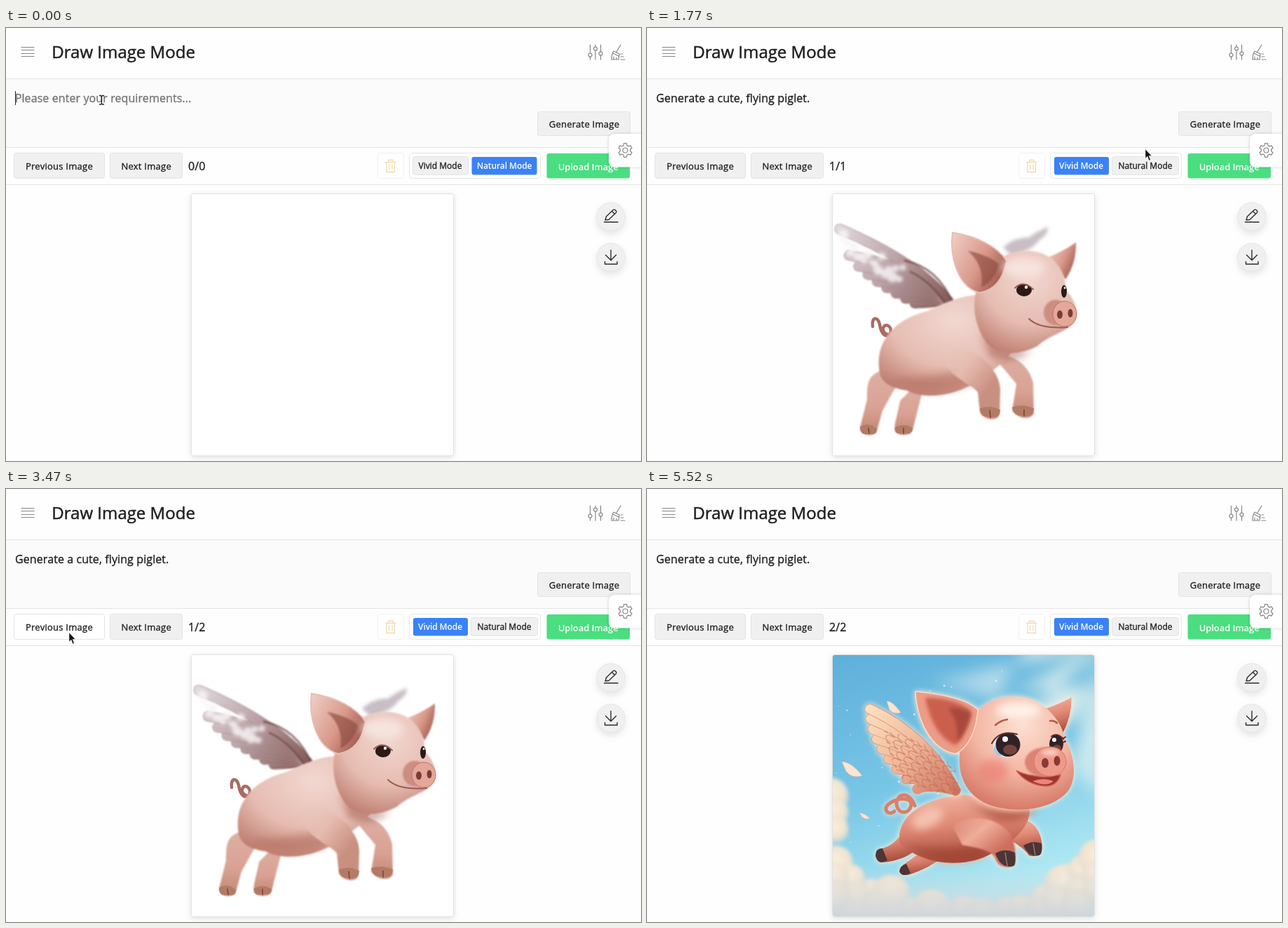
Animation of 906 by 618 pixels, one loop 5.99 s. Source, as an HTML page:

```html
<!DOCTYPE html>
<html lang="en">
<head>
<meta charset="utf-8">
<title>Draw Image Mode</title>
<style>
html, body { margin: 0; width: 100%; height: 100%; overflow: hidden; background: #fefefe; }
svg { display: block; width: 906px; height: 618px; font: 400 16px "Open Sans", "Noto Sans", sans-serif; fill: #212121; }
text { stroke: #212121; stroke-width: .35px; letter-spacing: .1px; }
.rule { fill: #e4e4e6; }
.btn { fill: #f0f0f1; stroke: #e3e3e5; }
.label { font-size: 13px; letter-spacing: .25px; text-anchor: middle; }
.mode { font-size: 12px; letter-spacing: 0; text-anchor: middle; }
.on { fill: #fff; stroke: none; font-weight: 600; letter-spacing: -.1px; }
.faint { fill: #757575; stroke: #757575; }
.line { fill: none; stroke-linecap: round; stroke-linejoin: round; }
.grey { stroke: #858585; stroke-width: 1.2; }
.dark { stroke: #2b2b2b; stroke-width: 1.4; }
.lift { filter: drop-shadow(0 5px 5px rgba(0,0,0,.1)); }
.card { filter: drop-shadow(0 2px 4px rgba(0,0,0,.12)); }
.halo { filter: drop-shadow(0 0 4px #ffeeda); }
.soft { filter: blur(1.2px); }
.misty { filter: blur(2.5px); }
.hazy { filter: blur(6px); }
.beams { filter: blur(11px); }
</style>
</head>
<body>
<svg viewBox="0 0 906 618">
<defs>
  <clipPath id="frame"><rect x="265" y="237" width="373" height="373" rx="3"/></clipPath>
  <radialGradient id="skin" cx=".55" cy=".25" r=".85">
    <stop stop-color="#f2d8d1"/><stop offset=".55" stop-color="#e6bcb1"/><stop offset="1" stop-color="#b87466"/>
  </radialGradient>
  <linearGradient id="limb" x2="0" y2="1">
    <stop stop-color="#deb0a5"/><stop offset=".6" stop-color="#d9a193"/><stop offset="1" stop-color="#c08472"/>
  </linearGradient>
  <linearGradient id="arm" x2=".7" y2=".7">
    <stop offset=".05" stop-color="#ecc9bf" stop-opacity="0"/><stop offset=".5" stop-color="#e6bcb0"/><stop offset="1" stop-color="#c98f80"/>
  </linearGradient>
  <linearGradient id="ear" x2="1" y2=".6">
    <stop stop-color="#f0cfc6"/><stop offset=".6" stop-color="#d9998a"/><stop offset="1" stop-color="#a45d50"/>
  </linearGradient>
  <linearGradient id="plume" gradientUnits="userSpaceOnUse" x1="268" y1="285" x2="438" y2="392">
    <stop stop-color="#e2dbdf"/><stop offset=".45" stop-color="#bea7ab"/><stop offset="1" stop-color="#805551"/>
  </linearGradient>
  <linearGradient id="sky" x1=".1" x2=".4" y2="1">
    <stop stop-color="#5fb0dc"/><stop offset=".5" stop-color="#78c6e6"/><stop offset="1" stop-color="#b4ecf4"/>
  </linearGradient>
  <linearGradient id="ray" x1="1" y1="0" x2="0" y2=".8">
    <stop stop-color="#fffbe8"/><stop offset="1" stop-color="#fff" stop-opacity="0"/>
  </linearGradient>
  <radialGradient id="puff" cx=".5" cy=".4" r=".6">
    <stop stop-color="#f9efdb"/><stop offset=".6" stop-color="#f1e4d1"/><stop offset="1" stop-color="#dcd8d0" stop-opacity=".5"/>
  </radialGradient>
  <linearGradient id="mist" x2="0" y2="1">
    <stop stop-color="#d3d9de" stop-opacity="0"/><stop offset="1" stop-color="#ccd4dc" stop-opacity=".9"/>
  </linearGradient>
  <radialGradient id="face" cx=".55" cy=".25" r=".85">
    <stop stop-color="#fce0d2"/><stop offset=".5" stop-color="#f4b6a4"/><stop offset="1" stop-color="#cf6857"/>
  </radialGradient>
  <linearGradient id="belly" x2=".2" y2="1">
    <stop stop-color="#f4b9a5"/><stop offset=".5" stop-color="#e08976"/><stop offset="1" stop-color="#a94c3b"/>
  </linearGradient>
  <linearGradient id="reach" x2=".7" y2=".7">
    <stop offset=".05" stop-color="#f3b9a6" stop-opacity="0"/><stop offset=".5" stop-color="#f0ad9a"/><stop offset="1" stop-color="#cd6f5e"/>
  </linearGradient>
  <linearGradient id="quill" gradientUnits="userSpaceOnUse" x1="310" y1="310" x2="446" y2="434">
    <stop stop-color="#fde3c2"/><stop offset=".5" stop-color="#f1b799"/><stop offset="1" stop-color="#cb705c"/>
  </linearGradient>
  <pattern id="scales" width="13" height="11" patternUnits="userSpaceOnUse" patternTransform="rotate(35)">
    <path class="line" d="M13 0Q0 1 1 5.500Q2 10 13 11" stroke="#b9624a" stroke-width="1.1"/>
  </pattern>
</defs>

<rect width="906" height="618" fill="#fefefe"/>
<rect y="73" width="906" height="97" fill="#fbfbfb"/>
<path class="rule" d="M0 72H906V73H0ZM0 170H906V171H0ZM0 223H906V224H0Z"/>

<!-- header -->
<path class="line grey" d="M22 27.500H40M22 31.500H40M22 36.500H40M22 40.500H40"/>
<text x="65.300" y="42.500" style="font-size:24px;letter-spacing:0;stroke-width:.5px">Draw Image Mode</text>
<g class="line grey">
  <path d="M833.500 24V36M833.500 41V45M841 24V27M841 32V45M848.500 24V34M848.500 39V45"/>
  <circle cx="833.500" cy="38.500" r="2.500"/><circle cx="841" cy="29.500" r="2.500"/><circle cx="848.500" cy="36.500" r="2.500"/>
  <path d="M877 24L871 34M867 33L875 37L874 45H864Q864 37 867 33ZM866 36L874 40M867 45V41M871 45V42M877 37H880M877 41H881M877 45H883"/>
</g>

<!-- prompt -->
<g id="hint">
  <text class="faint" x="12.700" y="105.500">Please enter your requirements...</text>
  <rect x="13" y="90" width="1" height="20"/>
</g>
<text id="prompt" x="13" y="105.500">Generate a cute, flying piglet.</text>
<rect id="generate" class="btn" x="758.500" y="119.500" width="132" height="34" rx="3"/>
<text class="label" x="825" y="141.500">Generate Image</text>

<!-- toolbar -->
<rect id="previous" class="btn" x="11.500" y="178.500" width="129" height="36" rx="3"/>
<text class="label" x="76" y="202">Previous Image</text>
<rect id="next" class="btn" x="148.500" y="178.500" width="103" height="36" rx="3"/>
<text class="label" x="200.200" y="202">Next Image</text>
<g>
  <text id="none" x="260" y="202.500">0/0</text>
  <text id="single" x="260" y="202.500">1/1</text>
  <text id="first" x="260" y="202.500">1/2</text>
  <text id="second" x="260" y="202.500">2/2</text>
</g>
<rect x="530.500" y="178.500" width="37" height="36" rx="3" fill="#fff" stroke="#f0f0f0"/>
<path class="line" stroke="#f1d9b0" stroke-width="1.300" d="M541.500 191.500H556M545.500 191V188.500H552V191M543 192V205.500H554.500V192M546.500 195V202M551 195V202"/>
<rect x="575.500" y="178.500" width="187" height="36" rx="4" fill="#fff" stroke="#e6e6e8"/>
<g id="natural">
  <rect class="btn" x="580.500" y="183.500" width="79" height="26" rx="3"/>
  <rect x="664.500" y="184" width="93" height="25.500" rx="3" fill="#3b82f6"/>
  <text class="mode" x="619.500" y="201">Vivid Mode</text>
  <text class="mode on" x="711" y="201">Natural Mode</text>
</g>
<g id="vivid">
  <rect x="581" y="184" width="78" height="25.500" rx="3" fill="#3b82f6"/>
  <rect class="btn" x="663.500" y="183.500" width="95" height="26" rx="3"/>
  <text class="mode on" x="619.500" y="201">Vivid Mode</text>
  <text class="mode" x="711" y="201">Natural Mode</text>
</g>
<rect x="771.500" y="179" width="118.500" height="35.500" rx="3" fill="#4ade80"/>
<text class="label on" x="830.700" y="203">Upload Image</text>
<rect x="860" y="151" width="60" height="47.500" rx="8" fill="#fff" style="filter:drop-shadow(0 0 2px rgba(0,0,0,.18))"/>
<polygon id="gear" class="line grey" transform="translate(883.500 174.500)"/>
<circle class="line grey" cx="883.500" cy="174.500" r="3.500"/>

<!-- side buttons -->
<g class="lift" fill="#f0f0f1" stroke="#e6e6e8"><circle cx="863" cy="269" r="20"/><circle cx="863" cy="327" r="20"/></g>
<path class="line dark" d="M853.500 277H873M855 274L856.500 269L866.500 259.500Q868 258.500 869.500 260L870.500 261Q871.500 262.500 870 264L860 273.500ZM864.500 261.500L868.500 265.500"/>
<path class="line dark" d="M863 317V331M855.500 324L863 331.500L870.500 324M854.500 333.500V337H872V333.500"/>

<!-- picture card -->
<rect class="card" x="264.500" y="236.500" width="374" height="374" rx="3" fill="#fff" stroke="#e2e2e4"/>

<g id="piglet" clip-path="url(#frame)">
  <path class="misty" fill="#c9bec5" d="M508 313Q525 298 545 299Q560 288 572 284Q572 296 560 302Q550 318 520 325Z"/>
  <g class="soft"><g id="plumes" class="line"></g>
    <path class="line" stroke="#754b48" stroke-width="3" d="M368 332Q415 342 436 392M376 348Q405 362 425 392" opacity=".7"/>
  </g>
  <g id="down" class="misty" fill="#f7f4f7" opacity=".85"></g>
  <path class="line" stroke="#a96c62" stroke-width="4.500" d="M322 426C320 411 330 412 332 423C334 438 342 443 347 436C351 428 341 419 337 428C335 435 344 440 350 437"/>
  <g class="soft" fill="url(#limb)">
    <path d="M340 488C314 493 314 508 314 530L304 570C303 583 326 584 328 575L336 546L355 512Z"/>
    <path d="M385 508L361 532C358 550 351 570 354 576C360 583 377 582 379 574L386 546L394 515Z"/>
    <path d="M497 472L527 508L521 546C530 559 548 559 552 550L551 507C545 480 525 469 505 466Z"/>
  </g>
  <path class="soft" fill="url(#skin)" d="M332 492C325 455 345 418 400 404C440 385 465 376 490 385L528 445C524 470 490 492 462 510C432 526 395 530 370 517C348 514 335 506 332 492Z"/>
  <path class="hazy" fill="#a9604f" opacity=".45" d="M345 500Q395 500 440 490Q470 500 455 510Q400 530 345 500Z"/>
  <path class="soft" fill="url(#arm)" d="M418 468C430 498 463 508 472 520L475 549C483 561 500 561 503 552L504 518C505 495 480 460 440 456Z"/>
  <g fill="#b37b64"><path d="M304 569Q316 562 328 572Q328 582 317 579Q304 583 304 569ZM354 570Q367 563 379 571Q378 582 366 578Q353 582 354 570ZM475 543Q490 537 504 545Q503 559 490 555Q476 557 475 543ZM521 541Q537 536 552 543Q551 557 538 553Q523 555 521 541Z"/></g>
  <path class="line" stroke="#774336" stroke-width="1.500" d="M317 579L316 571M366 579L366 571M490 556L489 546M538 554L538 545"/>
  <path class="soft" fill="url(#ear)" d="M573 327Q595 318 612 306Q613 335 597 359Z"/>
  <path class="hazy" fill="#9b5549" opacity=".55" d="M474 430Q500 470 548 458Q530 482 490 470Z"/>
  <path class="soft" fill="url(#skin)" d="M468 385C472 342 505 318 545 318C582 320 598 348 598 375C612 388 617 410 608 422C595 435 575 438 557 454C530 468 500 468 485 450C470 430 465 405 468 385Z"/>
  <path fill="url(#ear)" stroke="#e7beb4" stroke-width="2" d="M436 292C432 320 440 368 474 378C494 375 508 360 513 332C500 312 470 297 436 292Z"/>
  <path class="soft" fill="#8d4a40" opacity=".65" d="M458 318Q490 325 503 338Q495 362 477 370Q482 340 458 318Z"/>
  <ellipse class="hazy" cx="537" cy="342" rx="30" ry="14" fill="#f6e3dd"/>
  <g fill="#2c1a18"><ellipse cx="538" cy="374" rx="11" ry="9"/><ellipse cx="595" cy="376" rx="4" ry="9"/></g>
  <g fill="#fff"><circle cx="541" cy="370" r="2.200"/><circle cx="596" cy="371" r="1.400"/></g>
  <path class="line" stroke="#9b5b51" stroke-width="2" d="M525 371Q537 359 551 373M545 415Q560 430 600 427"/>
  <ellipse class="soft" cx="583" cy="406" rx="17" ry="18" fill="#cf8c82"/>
  <ellipse cx="596" cy="408" rx="17" ry="18" fill="#e6a79b" stroke="#b8766b"/>
  <g fill="#7c3a34"><ellipse cx="589" cy="409" rx="4" ry="6"/><ellipse cx="604" cy="407" rx="3.500" ry="6"/></g>
</g>

<g id="flyer" clip-path="url(#frame)">
  <rect x="264" y="236" width="375" height="375" fill="url(#sky)"/>
  <g class="beams" fill="url(#ray)"><path d="M650 225L400 275L500 300ZM650 225L530 330L615 330ZM650 235L605 400L650 440ZM540 225L650 225L650 280L500 290Z"/></g>
  <g id="sparks" fill="#fff" opacity=".7"></g>
  <g id="clouds" class="misty"></g>
  <rect x="264" y="540" width="375" height="71" fill="url(#mist)"/>
  <g fill="#fde4d3" stroke="#e3b7a4" stroke-width=".7">
    <path d="M342 303Q350 302 362 319Q352 322 346 315ZM278 389Q292 390 307 409Q293 414 284 403ZM303 462Q311 463 318 470Q309 474 303 462Z"/>
  </g>
  <g class="halo">
    <path class="line" stroke="#d8806c" stroke-width="5" d="M382 452C374 430 356 434 356 450C358 466 376 464 377 450C375 434 338 446 341 458C343 464 350 463 353 460"/>
    <g fill="url(#belly)">
      <path d="M372 478C355 508 345 510 332 514C324 520 326 532 334 533C358 532 380 522 390 508Z"/>
      <path d="M400 512L366 536C357 546 364 552 372 551C392 545 412 535 424 522Z"/>
      <path d="M516 475C540 464 560 480 563 503C566 520 558 527 545 523C538 512 525 505 510 497Z"/>
      <path d="M360 495C362 465 395 442 450 436L545 452C552 480 520 508 480 526C435 543 385 530 360 505Z"/>
    </g>
    <ellipse class="hazy" cx="400" cy="470" rx="24" ry="13" fill="#f8cdbb" opacity=".8" transform="rotate(-25 400 470)"/>
    <path class="hazy" fill="#98402f" opacity=".6" d="M370 508Q430 520 480 505Q490 520 470 528Q410 540 370 508ZM450 445Q505 472 560 451Q540 478 500 474Z"/>
    <path class="soft" fill="url(#reach)" d="M436 482C460 460 502 470 518 492C527 508 527 525 524 537C515 542 502 540 498 530C493 516 480 514 450 508Z"/>
    <g fill="#4b3537"><path d="M326 524Q326 512 336 513L343 530Q330 537 326 524ZM360 546Q361 537 370 535L376 548Q364 555 360 546ZM497 520Q511 512 525 519Q527 536 523 538Q505 543 497 520ZM537 509Q550 501 563 506Q565 521 559 523Q546 526 537 509Z"/></g>
    <path class="line" stroke="#a88a86" stroke-width="1.200" d="M511 519L514 538M551 506L554 523"/>
  </g>
  <g id="quills" class="line halo"></g>
  <path fill="url(#scales)" opacity=".65" d="M338 345Q400 355 440 400L447 433Q400 440 362 412Q345 385 338 345Z"/>
  <g class="halo">
    <path fill="url(#belly)" stroke="#fbd9c5" d="M566 314Q590 306 606 297Q607 325 592 352Z"/>
    <path fill="url(#face)" d="M446 382C448 330 480 295 525 296C562 297 590 325 597 358C612 385 613 415 600 432C580 455 540 461 510 456C465 450 444 420 446 382Z"/>
    <path fill="#ec9c87" stroke="#fcdcc9" stroke-width="1.500" d="M383 289C385 330 405 372 440 378C458 370 470 345 472 315C455 298 415 292 383 289Z"/>
  </g>
  <path class="misty" fill="#cb5f4e" d="M397 298Q440 298 463 317Q455 352 440 366Q408 352 397 298Z"/>
  <path class="misty" fill="#963d33" opacity=".65" d="M430 312Q455 312 463 322Q455 350 442 362Q446 335 430 312Z"/>
  <ellipse class="hazy" cx="530" cy="316" rx="32" ry="11" fill="#fff1e7"/>
  <ellipse class="hazy" cx="494" cy="402" rx="22" ry="16" fill="#ec7a70" opacity=".6"/>
  <g>
    <ellipse cx="513" cy="366" rx="19" ry="17" fill="#e6eef2"/><ellipse cx="515" cy="365" rx="17.500" ry="17" fill="#2f2226"/>
    <ellipse cx="518" cy="372" rx="10" ry="7" fill="#774338"/><circle cx="511" cy="357" r="4" fill="#fff"/><path fill="#8dcdf0" d="M496 364Q498 378 509 380Q500 384 495 372Z"/>
    <ellipse cx="584" cy="364" rx="10" ry="13" fill="#2f2226"/><ellipse cx="585" cy="370" rx="6" ry="5" fill="#774338"/><circle cx="581" cy="358" r="3" fill="#fff"/>
  </g>
  <path class="line" stroke="#5b2a27" stroke-width="2" d="M492 363Q503 343 528 350M577 353Q586 347 594 357M592 357L597 354M593 362L597 360"/>
  <path class="line" stroke="#b8594a" stroke-width="2.500" d="M497 337Q505 330 514 329M575 331Q581 330 585 334"/>
  <path fill="#9c342f" stroke="#c9604f" stroke-width="1.500" d="M527 402Q550 414 590 408Q585 424 568 424Q542 422 527 402Z"/>
  <path fill="#ee8478" d="M550 417Q566 411 580 417Q570 426 550 417Z"/>
  <ellipse class="soft" cx="567" cy="390" rx="28" ry="21" fill="#dd8376"/>
  <ellipse cx="575" cy="389" rx="23" ry="21" fill="#ee9a8b" stroke="#d4766a"/>
  <ellipse class="misty" cx="575" cy="376" rx="12" ry="4" fill="#fbd0c3"/>
  <g fill="#8e3833"><ellipse cx="568" cy="391" rx="5" ry="7"/><ellipse cx="585" cy="388" rx="4.500" ry="7"/></g>
</g>

<!-- pointers -->
<g id="beam"><path class="line" stroke="#222" stroke-width="1.300" d="M133.500 96.500H135.500L136.500 97.500L137.500 96.500H139.500M136.500 97.500V108M133.500 109H135.500L136.500 108L137.500 109H139.500"/></g>
<g id="pointer">
  <circle id="click" r="12" fill="#f4ea2a" opacity="0"/>
  <path d="M0 0V13L3 10.300L5.200 16L7.400 15.200L5.100 9.600H9Z" fill="#111" stroke="#fff" stroke-width=".5"/>
</g>
</svg>

<script>
const LOOP = 5990;
const $ = id => document.getElementById(id);
const range = n => [...Array(n).keys()];

// Random numbers that are the same on every load
let seed = 7;
const rand = () => (seed = seed * 16807 % 2147483647) / 2147483647;

function add(parent, tag, attrs) {
  const el = document.createElementNS('http://www.w3.org/2000/svg', tag);
  for (const key in attrs) el.setAttribute(key, attrs[key]);
  $(parent).append(el);
}
const dot = (parent, cx, cy, r, extra) => add(parent, 'circle', { cx, cy, r, ...extra });

function feathers(parent, paint, edge, base, count, tipAt, bendAt) {
  for (const i of range(count).reverse()) {
    const u = i / (count - 1);
    const d = `M${tipAt(u)}Q${bendAt(u)} ${base}`;
    add(parent, 'path', { d, stroke: edge, 'stroke-width': 15 });
    add(parent, 'path', { d, stroke: `url(#${paint})`, 'stroke-width': 13.5 });
  }
}
feathers('plumes', 'plume', '#a98c8e', [430, 390], 9,
  u => [275 + 107 * u, 287 + 106 * Math.sqrt(u)], u => [388, 335 + 58 * u]);
feathers('quills', 'quill', '#d58f74', [440, 430], 9,
  u => [318 + 68 * u * u, 314 + 114 * u], u => [400, 352 + 68 * u]);

for (const i of range(18)) dot('down', 280 + i * 5, 295 + i * 2.5 + rand() * 28, 3 + rand() * 5);
for (const i of range(24)) dot('sparks', 270 + rand() * 260, 245 + rand() * 260, .5 + rand());

// Cloud bank: low in the middle, rising to both sides
for (const row of range(3)) for (const i of range(15)) {
  const x = 262 + i * 27 + rand() * 10, side = (x - 450) / 188;
  dot('clouds', x, 602 - 80 * side * side + row * 26 + rand() * 12, 17 + rand() * 12, { fill: 'url(#puff)' });
}
for (const i of range(3)) dot('clouds', 262 + i * 3, 438 + i * 24, 26 - i * 3, { fill: 'url(#puff)' });

$('gear').setAttribute('points', range(6).flatMap(i =>
  [[-.36, 7.2], [-.2, 10], [.2, 10], [.36, 7.2]].map(([turn, r]) => {
    const a = i * Math.PI / 3 + Math.PI / 6 + turn;
    return [r * Math.cos(a), r * Math.sin(a)];
  })).join(' '));

// Hard steps: each value holds until the next time
function track(id, prop, steps) {
  const frames = steps.map(([t, v]) => ({ offset: t / LOOP, [prop]: v, easing: 'step-end' }));
  frames.push({ offset: 1, [prop]: steps.at(-1)[1] });
  $(id).animate(frames, { duration: LOOP, iterations: Infinity });
}
function during(id, prop, on, off, spans) {
  const steps = spans.flatMap(([a, b]) => b < LOOP ? [[a, on], [b, off]] : [[a, on]]);
  if (steps[0][0] > 0) steps.unshift([0, off]);
  track(id, prop, steps);
}
const show = (id, ...spans) => during(id, 'opacity', 1, 0, spans);
const hover = (id, ...spans) => during(id, 'fill', '#ffffff', '#f0f0f1', spans);

show('hint', [0, 130]);
show('prompt', [130, LOOP]);
show('none', [0, 950]);
show('single', [950, 1970]);
show('first', [3470, 4280]);
show('second', [1970, 3470], [4280, LOOP]);
show('piglet', [950, 1970], [3470, 4280]);
show('flyer', [1970, 3470], [4280, LOOP]);
show('natural', [0, 1570]);
show('vivid', [1570, LOOP]);
hover('generate', [740, 950], [1840, 2510]);
hover('next', [2590, 3200], [4010, 4680]);
hover('previous', [3200, 4010]);

show('beam', [0, 530]);
show('pointer', [530, 950], [1030, 5520]);
during('click', 'opacity', .75, 0, [[810, 880], [1500, 1570], [1900, 1970], [3340, 3410], [4210, 4280]]);

const ease = u => u * u * (3 - 2 * u);
function glide(t0, t1, n, from, to) {
  return range(n).map(i => {
    const k = ease((i + 1) / n);
    return [t0 + (t1 - t0) * i / (n - 1), ...from.map((v, j) => v + (to[j] - v) * k)];
  });
}
const text = [136, 102], create = [824, 147], mode = [598, 198];
const ahead = [206, 204], back = [90, 205], forth = [176, 204], rest = [829, 480];
const path = [
  [0, ...text],
  ...glide(530, 740, 4, text, create),
  [1030, 640, 188], [1100, 591, 195], [1170, ...mode],
  ...glide(1640, 1840, 4, mode, create),
  ...glide(2430, 2590, 3, create, [205, 203]),
  [2860, ...ahead],
  ...glide(3060, 3340, 5, ahead, back),
  ...glide(3870, 4140, 5, back, forth),
  ...glide(4610, 5170, 9, forth, rest),
  ...glide(5240, 5520, 5, rest, [871, 622])
];
track('pointer', 'transform', path.map(([t, x, y]) => [t, `translate(${Math.round(x)}px, ${Math.round(y)}px)`]));
</script>
</body>
</html>
```
